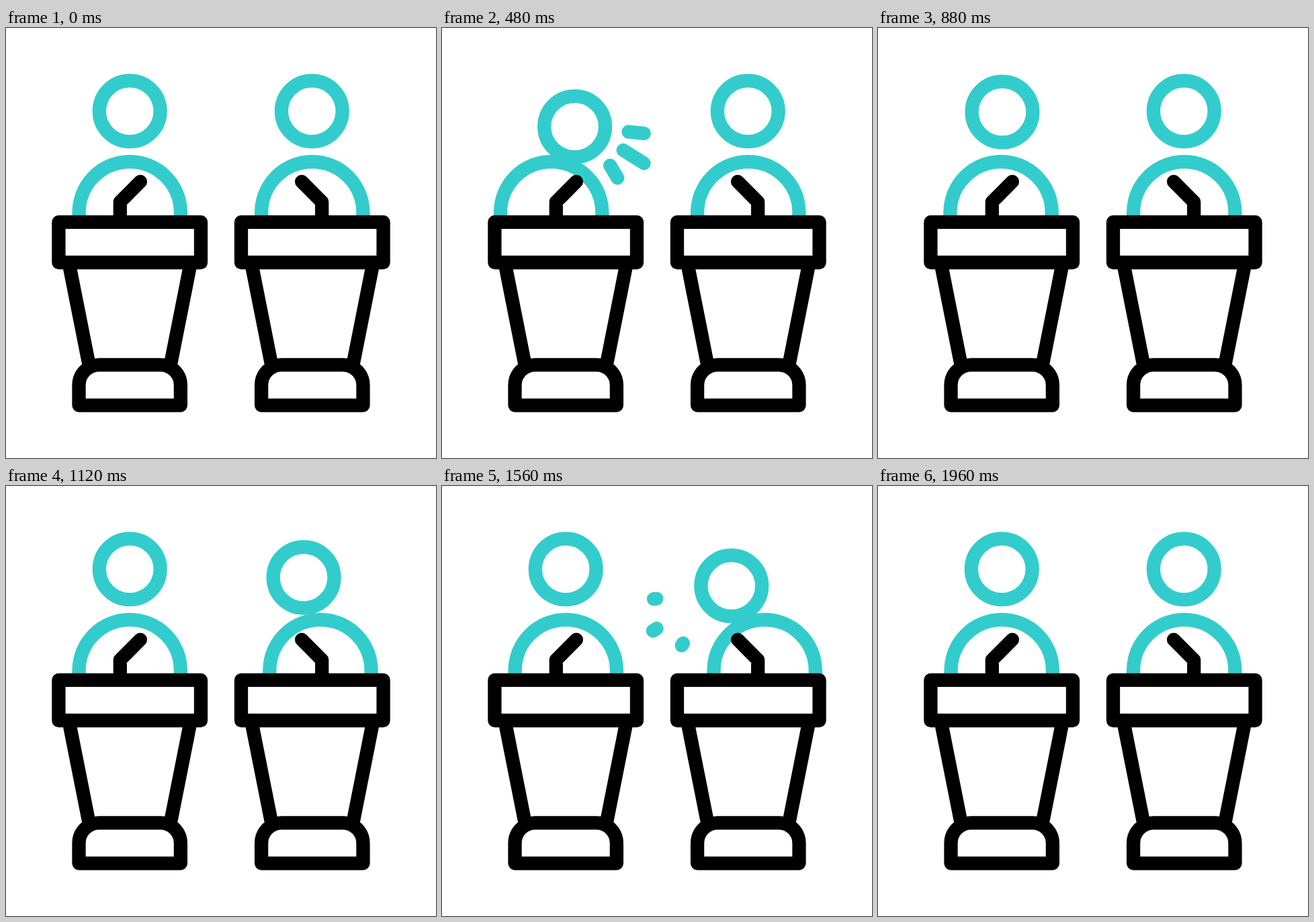
These frames come from a looping animation (640x640 px, 2000 ms). An HTML page:

```html
<!DOCTYPE html>
<html lang="en">
<head>
<meta charset="utf-8">
<title>Debate</title>
<style>
  html, body { margin: 0; width: 100%; height: 100%; overflow: hidden; background: #fff; }
  svg { display: block; width: 100vw; height: 100vh; }
</style>
</head>
<body>
<svg viewBox="0 0 640 640" fill="none" stroke-width="20.3" stroke-linecap="round" stroke-linejoin="round">
  <defs>
    <path id="podium" d="M93.4 349L123.6 501.3M275 349L244.8 501.3
      M78.4 288.9H290V349H78.4Z
      M108.5 561.6V531.5a30.2 30.2 0 0 1 30.2-30.2H229.7a30.2 30.2 0 0 1 30.2 30.2V561.6Z
      M169.8 288.9V258.9L199.9 228.7"/>
    <path id="body" stroke-linecap="butt" d="M108.6 288.9V274.6a75.65 75.65 0 0 1 151.3 0V288.9"/>
  </defs>
  <g id="speakers" stroke="#33cccc"></g>
  <g stroke="#000">
    <use href="#podium"/>
    <use href="#podium" transform="matrix(-1 0 0 1 640 0)"/>
  </g>
</svg>
<script>
const LOOP = 2000, STEP = 40;
const layer = document.getElementById("speakers");

// Rays as [inner x, inner y, outer x, outer y], for the left speaker
const RAYS = [
  [277.6, 154.5, 305, 157.4],
  [269.8, 182, 306.1, 204.8],
  [250.2, 204.6, 263.2, 226.6]
];

// The right speaker is drawn mirrored, so all offsets share one direction
const SPEAKERS = [
  { headX: 184.2, lean: [13.4, 23.1], slide: -21.6, rayShift: [0, 0],
    rise: [80, 360], fall: [640, 920] },
  { mirror: true, headX: 184.7, lean: [24.5, 24.9], slide: -24.4, rayShift: [20, 10.8],
    rise: [920, 1320], fall: [1600, 1960] }
];

function add(parent, tag, attrs = {}) {
  const el = document.createElementNS("http://www.w3.org/2000/svg", tag);
  for (const key in attrs) el.setAttribute(key, attrs[key]);
  return parent.appendChild(el);
}

function ease(t, from, to) {
  const u = Math.min(1, Math.max(0, (t - from) / (to - from)));
  return u * u * (3 - 2 * u);
}

for (const s of SPEAKERS) {
  const group = add(layer, "g", s.mirror ? { transform: "matrix(-1 0 0 1 640 0)" } : {});
  s.body = add(group, "use", { href: "#body" });
  s.head = add(group, "circle", { cx: s.headX, cy: 123.7, r: 45.4 });
  s.rays = add(group, "path", { transform: `translate(${s.rayShift})` });
}

function rayPath(start, end) {
  if (end <= start) return "";
  return RAYS.map(([x1, y1, x2, y2]) => {
    const at = k => `${x1 + (x2 - x1) * k} ${y1 + (y2 - y1) * k}`;
    return `M${at(start)}L${at(end)}`;
  }).join("");
}

function render(t) {
  for (const s of SPEAKERS) {
    const pose = ease(t, ...s.rise) - ease(t, ...s.fall);
    const shout = s.rise[1];
    s.body.setAttribute("transform", `translate(${s.slide * pose} 0)`);
    s.head.setAttribute("transform", `translate(${s.lean[0] * pose} ${s.lean[1] * pose})`);
    s.rays.setAttribute("d", rayPath(ease(t, shout + 120, shout + 280), ease(t, shout, shout + 160)));
  }
}

const origin = performance.now();
function tick() {
  const t = (performance.now() - origin) % LOOP;
  render(Math.floor(t / STEP) * STEP);
  requestAnimationFrame(tick);
}
tick();
</script>
</body>
</html>
```
